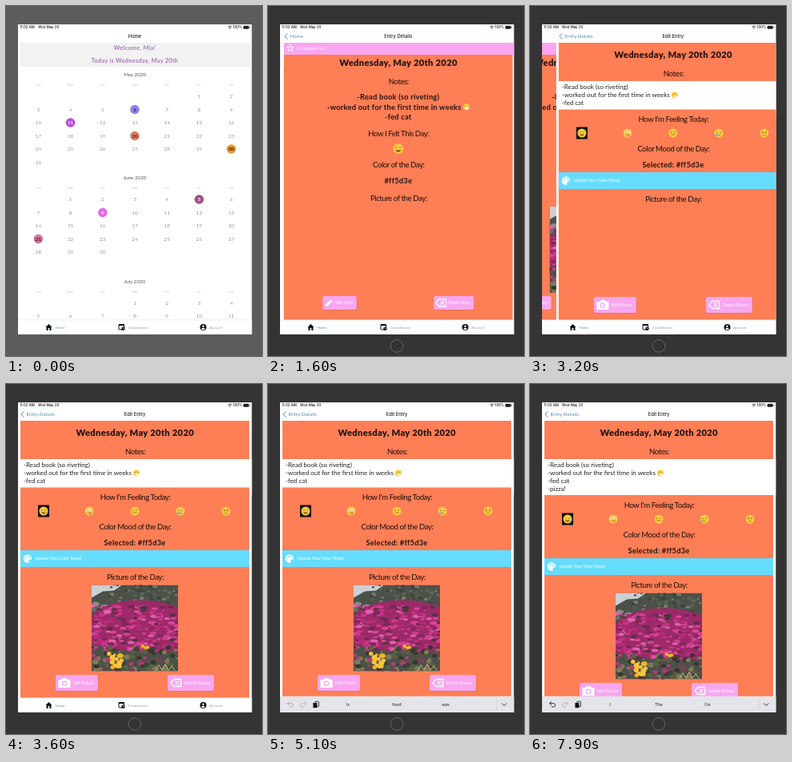
An HTML page that plays this animation: 320 px wide and 438 px high, repeating every 8000 ms.

```html
<!DOCTYPE html>
<html lang="en">
<head>
<meta charset="utf-8">
<title>Mood calendar</title>
<style>
html, body { margin: 0; width: 100%; height: 100%; overflow: hidden; background: #343434; }
svg { display: block; width: 100vw; height: 100vh; font-family: Lato, "Open Sans", sans-serif; }
text { white-space: pre; }
</style>
</head>
<body>
<svg id="stage" viewBox="0 0 320 438" xmlns="http://www.w3.org/2000/svg"></svg>
<script>
const LOOP = 8000, STEP = 100;
const ORANGE = '#fe7e56', PINK = '#f8a6ef', CYAN = '#66dcfd', BLUE = '#4a93c4', BROWN = '#8a5a1c';
const LEFT = 15, TOP = 23, WIDE = 292.5, HIGH = 388;

// ---- drawing helpers
const rect = (x, y, w, h, fill, more = '') =>
  `<rect x="${x}" y="${y}" width="${w}" height="${h}" fill="${fill}" ${more}/>`;
const circle = (x, y, r, fill, more = '') =>
  `<circle cx="${x}" cy="${y}" r="${r}" fill="${fill}" ${more}/>`;
const fillPath = (d, fill, more = '') => `<path d="${d}" fill="${fill}" ${more}/>`;
const line = (d, stroke, w = 1) =>
  `<path d="${d}" fill="none" stroke="${stroke}" stroke-width="${w}" stroke-linecap="round" stroke-linejoin="round"/>`;
const at = (x, y, body, id = '') => `<g ${id && `id="${id}"`} transform="translate(${x} ${y})">${body}</g>`;

// y is the middle of the line
function text(x, y, s, size, { w = 400, fill = '#111', a = 'middle', ls = 0, font = '', id = '' } = {}) {
  return `<text x="${x}" y="${(y + size * .35).toFixed(2)}" font-size="${size}" font-weight="${w}" fill="${fill}"
    text-anchor="${a}" letter-spacing="${ls}" ${font && `font-family="${font}"`} ${id && `id="${id}"`}>${s}</text>`;
}
const heading = (y, s) => text(161.2, y, s, 11.2, { w: 900, ls: .28, fill: '#251513' });
const strong = (x, y, s) => text(x, y, s, 9.3, { w: 700, ls: .22, fill: '#251513' });
const label = (y, s) => text(161.5, y, s, 9.6, { ls: -.42, fill: '#1c100c' });
const navTitle = s => text(161, 38, s, 5.8, { w: 500, fill: '#222', font: 'Inter, sans-serif' });
const back = s => line('M22.2 34.6 L19 38 L22.2 41.4', BLUE, 1) +
  text(25.5, 38, s, 6.3, { fill: BLUE, a: 'start' });

function seeded(seed) {
  return () => (seed = (seed * 16807) % 2147483647) / 2147483647;
}

// ---- faces
const eyes = y => circle(-2, y, .75, BROWN) + circle(2, y, .75, BROWN);
const arcs = line('M-3 -1 q.9 -1.4 1.8 0 M1.2 -1 q.9 -1.4 1.8 0', BROWN, .7);
const MOODS = {
  smile: arcs + fillPath('M-3 1 Q0 2 3 1 Q2 3.8 0 3.8 T-3 1', BROWN),
  zany: circle(-2, -1.4, 1.7, '#fff') + circle(2.2, -1, 1.2, '#fff') + circle(-2, -1.2, .7, '#543') +
    circle(2.2, -1, .5, '#543') + line('M-2.5 2 Q0 3.2 2.8 1.6', BROWN, .6) +
    fillPath('M0 2.6 h2.2 v1.5 q-1 1.4 -2.2 0z', '#ee6b75'),
  neutral: eyes(-1) + line('M-2.3 2 H2.3', BROWN, .7),
  cry: eyes(-.6) + line('M-2 3 Q0 1.6 2 3', BROWN, .7) + circle(-2.8, 2.6, 1.4, '#62b8ec'),
  angry: eyes(-.2) + line('M-3.2 -2 L-1 -1 M3.2 -2 L1 -1 M-2 3 Q0 1.6 2 3', BROWN, .6),
  giggle: arcs + fillPath('M-2.6 1.2 Q1 -.6 4.6 1.8 Q5 5.4 1 5.4 Q-2 5 -2.6 1.2', '#fff0cc')
};
const face = (x, y, r, mood) => `<g transform="translate(${x} ${y}) scale(${r / 5.5})">` +
  circle(0, 0, 5.5, '#fbcb40') + MOODS[mood] + '</g>';

// ---- icons
const pencil = fillPath('M-4.5 4.5 L-3.7 1.4 L2 -4.3 L4.3 -2 L-1.4 3.7Z', '#fff') + line('M1 -3.2 L3.3 -.9', PINK, .7);
const erase = fillPath('M-6.5 0 L-2.6 -4.5 H6.2 V4.5 H-2.6Z', 'none', 'stroke="#fff" stroke-width="1.3"') +
  line('M-.6 -2 L3.4 2 M3.4 -2 L-.6 2', '#fff', 1.2);
const camera = fillPath('M-7.5 -4 H-3.8 L-2.4 -6 H2.4 L3.8 -4 H7.5 V6 H-7.5Z', '#fff') +
  circle(0, .8, 3.3, PINK) + circle(0, .8, 2.1, '#fff');
const palette = circle(0, 0, 5.2, '#fff') + circle(3.6, 3.4, 2.4, CYAN) +
  [[-3, -.4], [-1.3, -2.9], [1.5, -2.9], [3.2, -.6]].map(p => circle(...p, .8, CYAN)).join('');
const star = (() => {
  const pts = Array.from({ length: 10 }, (_, i) => {
    const a = i * Math.PI / 5 - Math.PI / 2, r = i % 2 ? 2 : 4.4;
    return `${(r * Math.cos(a)).toFixed(2)} ${(r * Math.sin(a)).toFixed(2)}`;
  });
  return line(`M${pts.join('L')}Z`, '#fff', .9);
})();

function button(x, y, w, h, icon, s, gap, id = '') {
  return at(x, y, rect(.5, .8, w, h, '#b5553a', 'rx="2" opacity=".3"') + rect(0, 0, w, h, PINK, 'rx="2"') +
    at(gap / 2, h / 2, icon) + text(gap, h / 2, s, 5.1, { fill: '#fff', a: 'start' }), id);
}

// ---- photo of a flower bed, 108 by 108
function photo() {
  const rnd = seeded(77), pick = a => a[Math.floor(rnd() * a.length)];
  const between = (a, b) => a + rnd() * (b - a);
  const blob = (x, y, rx, ry, fill) =>
    `<ellipse cx="${x.toFixed(1)}" cy="${y.toFixed(1)}" rx="${rx.toFixed(1)}" ry="${ry.toFixed(1)}" fill="${fill}"/>`;
  const scatter = (n, x0, x1, y0, y1, r0, r1, flat, fills) => Array.from({ length: n }, () => {
    const r = between(r0, r1);
    return blob(between(x0, x1), between(y0, y1), r, r * flat, pick(fills));
  }).join('');
  return `<clipPath id="crop">${rect(0, 0, 108, 108, '#000')}</clipPath><g id="photo" clip-path="url(#crop)">` +
    rect(0, 0, 108, 108, '#4b5148') + fillPath('M0 0 H38 L28 7 L14 8 L0 16Z', '#cbd0d5') +
    scatter(70, 22, 108, 0, 24, 1, 3, .8, ['#3d443c', '#5d6657', '#525a4e', '#747a6c']) +
    scatter(12, 0, 18, 16, 36, 2, 5, .7, ['#8d8b87', '#6b6d66', '#a09d99']) +
    fillPath('M0 38 Q14 24 42 20 Q80 16 108 28 V82 Q60 90 0 74Z', '#9c2a68') +
    scatter(230, 0, 108, 26, 82, 1.5, 5, .45,
      ['#c93486', '#d8479b', '#b92a78', '#d13f92', '#7a2857', '#4c353d', '#dd62ad']) +
    scatter(110, 0, 108, 78, 108, 1, 4, .8, ['#3c4435', '#59613f', '#33382d', '#6f4450', '#b03c76', '#7f7a58']) +
    scatter(14, 20, 38, 84, 103, 2, 3.6, .9, ['#f2b324', '#f8c63a']) +
    scatter(4, 62, 70, 76, 82, 1.5, 2.6, .9, ['#f3b62a']) +
    line('M80 107 l4 -7 l4 7 l4 -8 l4 8 l4 -6 l4 6', '#b9b673', 1) + '</g>';
}
const picture = (y, id) => `<use href="#photo" x="107" y="${y}" id="${id}"/>`;

// ---- calendar page
const DAYS = ['Sun', 'Mon', 'Tue', 'Wed', 'Thu', 'Fri', 'Sat'];
const colX = c => 40.4 + c * 40.2;
function month(name, y, first, count, marks) {
  let s = text(161, y, name, 6.2, { fill: '#555' });
  DAYS.forEach((d, c) => s += text(colX(c), y + 13, d, 3.8, { fill: '#c4c4c4' }));
  for (let d = 1; d <= count; d++) {
    const n = d + first - 1, x = colX(n % 7), cy = y + 27 + Math.floor(n / 7) * 16.5;
    const [bg, ink, id = ''] = marks[d] || [];
    const dot = bg ? circle(x, cy, 5.8, bg) : '';
    s += at(0, 0, dot + text(x, cy, d, 6.4, { fill: ink || '#444', w: bg ? 700 : 300 }), id);
  }
  return s;
}
const calendar = rect(15, 23, WIDE, HIGH, '#fff') + navTitle('Home') + rect(17, 46, 288.5, 30, '#f2f2f2') +
  text(161, 52.5, 'Welcome, Mia!', 7.3, { w: 700, ls: .3, fill: '#a77bb9' }) +
  text(161, 68, 'Today is Wednesday, May 20th', 7.3, { w: 700, ls: .3, fill: '#a673b6' }) +
  month('May 2020', 86, 5, 31, {
    6: ['#9482e4', '#2b2350'], 11: ['#b24fd8', '#fff'], 20: ['#e07f62', '#3a1a12', 'today'], 30: ['#e9962f', '#3a2008'] }) +
  month('June 2020', 215, 1, 30, { 5: ['#a24f88', '#fff'], 9: ['#e768e6', '#fff'], 21: ['#d8739c', '#40182a'] }) +
  month('July 2020', 344.5, 3, 11, {});

// ---- entry page
const entry = rect(15, 23, WIDE, HIGH, '#fff') + back('Home') + navTitle('Entry Details') +
  rect(18, 61, 286, 332, ORANGE) + rect(18, 46, 288, 15, PINK) + at(26, 53, star) +
  text(34, 53.5, 'Countdown Set!', 5.1, { fill: '#fff', a: 'start' }) +
  heading(71.5, 'Wednesday, May 20th 2020') + label(94.5, 'Notes:') +
  strong(161, 114, '-Read book (so riveting)') +
  strong(156, 126.5, '-worked out for the first time in weeks') + face(246, 126, 4, 'giggle') +
  strong(161, 138.5, '-fed cat') + label(160, 'How I Felt This Day:') + face(161, 178.5, 6.3, 'smile') +
  label(199, 'Color of the Day:') + strong(161, 218.5, '#ff5d3e') + label(240.5, 'Picture of the Day:') +
  picture(251, 'entryPic') +
  button(66.5, 363, 42.5, 17, pencil, 'Edit Entry', 16, 'editBtn') +
  button(205.5, 363, 50, 17, erase, 'Delete Entry', 18);

// ---- edit page
const note = (y, s, id = '') => text(22, y, s, 8, { a: 'start', fill: '#222', id });
const moodRow = Object.keys(MOODS).slice(0, 5).map((m, i) => face(47 + i * 57, 159, 5.5, m)).join('');
const edit = rect(15, 23, WIDE, HIGH, '#fff') + back('Entry Details') + navTitle('Edit Entry') +
  rect(18, 46, 286, 347, ORANGE) + heading(61.5, 'Wednesday, May 20th 2020') + label(85, 'Notes:') +
  rect(15, 94, WIDE, 45, '#fff') +
  note(101.5, '-Read book (so riveting)') + note(111.5, '-worked out for the first time in weeks') +
  face(163, 111.5, 4, 'giggle') + note(121.5, '-fed cat', 'lastNote') + note(131.5, '', 'newNote') +
  rect(0, 0, .7, 9, '#333', 'id="caret"') +
  at(0, 0, rect(18, 129.5, 286, 270, ORANGE) + label(142, 'How I’m Feeling Today:') + rect(40, 151.5, 14, 15, '#111') + moodRow +
    label(178.5, 'Color Mood of the Day:') + strong(161, 198.5, 'Selected: #ff5d3e') +
    rect(18, 208, 286, 21, CYAN) + at(27, 218.5, palette) +
    text(36.5, 218.5, 'Update Your Color Mood', 5.3, { fill: '#fff', a: 'start' }) +
    label(241.5, 'Picture of the Day:') + picture(251.5, 'editPic') +
    button(62, 364, 53, 20, camera, 'Edit Picture', 22) +
    button(202, 364, 58, 20, erase, 'Delete Picture', 21), 'below');

// ---- bars
const tab = (x, s, fill) => text(x, 402, s, 4.6, { fill, a: 'start' });
const tabs = rect(15, 392.7, WIDE, 18.5, '#fff') + rect(15, 392.7, WIDE, .5, '#ddd') +
  at(53.5, 402, fillPath('M-4 0 L0 -4 L4 0 H3 V4 H.9 V1 H-.9 V4 H-3 V0Z', '#111')) + tab(61.5, 'Home', BLUE) +
  at(144.5, 401.5, rect(-3.5, -3, 6.6, 6.5, 'none', 'rx=".6" stroke="#111"') + rect(-3.5, -3.4, 6.6, 2, '#111') +
    circle(2, 2.2, 2.2, '#111') + line('M2 1 V2.4 H3', '#fff', .5)) + tab(152.5, 'Countdowns', '#999') +
  at(246.5, 402, circle(0, 0, 4, '#111') + circle(0, -1.2, 1.2, '#fff') +
    fillPath('M-2.4 2.3 Q0 -.6 2.4 2.3 Q0 4 -2.4 2.3', '#fff')) + tab(254, 'Account', '#999');

const arrow = 'M-1.4 -3.4 L-3.6 -1.3 L-1.4 .8 M-3.4 -1.3 H1.4 Q3.6 -1.2 3.6 .9 T1.4 3 H-.8';
const toolbar = rect(15, 390.7, WIDE, 21, '#e3e5ea') +
  `<g id="undo" transform="translate(28 401)">${line(arrow, '#222', .9)}</g>` +
  `<g transform="translate(44 401) scale(-1 1)">${line(arrow, '#b3b6bb', .9)}</g>` +
  at(60, 401.3, rect(-1.2, -4, 4.6, 6.4, '#e3e5ea', 'rx=".6" stroke="#111" stroke-width=".8"') +
    rect(-3.6, -2.4, 5, 6.4, '#111', 'rx=".7"')) +
  [100, 161, 222].map((x, i) => text(x, 401, '', 5.6, { id: 'word' + i, fill: '#222' })).join('') +
  rect(285.6, 394, .5, 14, '#c4c7cc') + line('M292.4 399.8 L295.2 402.6 L298 399.8', '#222', .9);

const small = { a: 'start', w: 500, fill: '#222', font: 'Inter, sans-serif' };
const status = text(17, 26.8, '11:02 AM', 4.4, small) + text(40, 26.8, 'Wed May 20', 4.4, small) +
  line('M277.6 25.6 q2.2 -1.8 4.4 0 M278.6 26.8 q1.2 -1 2.4 0', '#222', .7) + circle(279.8, 27.9, .6, '#222') +
  text(283.6, 26.8, '100%', 4.4, small) + rect(296.6, 24.8, 7, 4, '#222', 'rx="1"') + rect(304, 26, .7, 1.6, '#222');

document.getElementById('stage').innerHTML =
  `<defs><clipPath id="screen">${rect(LEFT, TOP, WIDE, HIGH, '#000')}</clipPath>${photo()}</defs>` +
  rect(0, 0, 320, 438, '#343434', 'id="bezel"') +
  circle(161, 425.5, 7.8, '#333', 'id="homeBtn" stroke="#686868" stroke-width=".9"') +
  `<g clip-path="url(#screen)">${at(0, 0, calendar, 'calendar')}${at(0, 0, entry, 'entry')}${at(0, 0, edit, 'edit')}
  ${status}${tabs}${at(0, 0, toolbar, 'toolbar')}</g>`;

// ---- motion
const el = id => document.getElementById(id);
const move = (id, x, y = 0) => el(id).setAttribute('transform', `translate(${x.toFixed(2)} ${y.toFixed(2)})`);
const show = (id, on) => el(id).style.opacity = +on;
const ramp = (t, a, b) => Math.min(1, Math.max(0, (t - a) / (b - a)));
// share of a page push still to go, a critically damped spring
const rest = (t, start) => {
  const k = Math.max(0, t - start) * .018;
  return (1 + k) * Math.exp(-k);
};

const FOCUS = 4400, OPENERS = ['I', 'The', 'I’m'];
const typing = [
  [FOCUS, null, ['is', 'food', 'was']],
  [5400, '', OPENERS],
  [5700, '-', OPENERS],
  [5900, '-p', ['“p”', 'put', 'play']],
  [6100, '-pi', ['“pi”', 'pick', 'pizza']],
  [6200, '-piz', ['“piz”', 'pizza', 'pizzas']],
  [6300, '-pizz', ['“pizz”', 'pizza', 'pizzas']],
  [6700, '-pizza', ['“pizza”', 'pizzas', 'pizza’s']],
  [7000, '-pizza!', OPENERS]
];

function draw(t) {
  const dark = ramp(t, 400, 800), grey = Math.round(92 - 40 * dark);
  el('bezel').setAttribute('fill', `rgb(${grey},${grey},${grey})`);
  show('homeBtn', dark);

  const toEntry = rest(t, 1200), toEdit = rest(t, 2950);
  move('calendar', -.3 * WIDE * (1 - toEntry));
  move('entry', toEntry * WIDE - .3 * WIDE * (1 - toEdit));
  move('edit', toEdit * WIDE);
  show('today', t >= 1000 && t < 1800 ? .6 : 1);
  show('editBtn', t >= 2800 && t < 3000 ? .5 : 1);
  show('entryPic', t >= 1900);
  show('editPic', t >= 3400);

  const up = 1 - (1 - ramp(t, 4000, 4400)) ** 2;
  move('toolbar', 0, 21 * (1 - up));

  const [since, typed, words] = typing.filter(s => s[0] <= t).pop() || typing[0];
  const fresh = typed !== null;
  move('below', 0, fresh ? 10 : 0);
  el('newNote').textContent = typed || '';
  words.forEach((w, i) => el('word' + i).textContent = w);
  show('undo', fresh ? 1 : .3);

  const caret = el('caret');
  const end = fresh ? (typed ? el('newNote').getComputedTextLength() : 0) : el('lastNote').getComputedTextLength();
  caret.setAttribute('x', 22.3 + end);
  caret.setAttribute('y', fresh ? 127 : 117);
  show('caret', t >= FOCUS && (t - since) % 1000 < 500);
}

function tick(now) {
  draw(Math.floor(now % LOOP / STEP) * STEP);
  requestAnimationFrame(tick);
}
draw(0);
requestAnimationFrame(tick);
</script>
</body>
</html>
```
